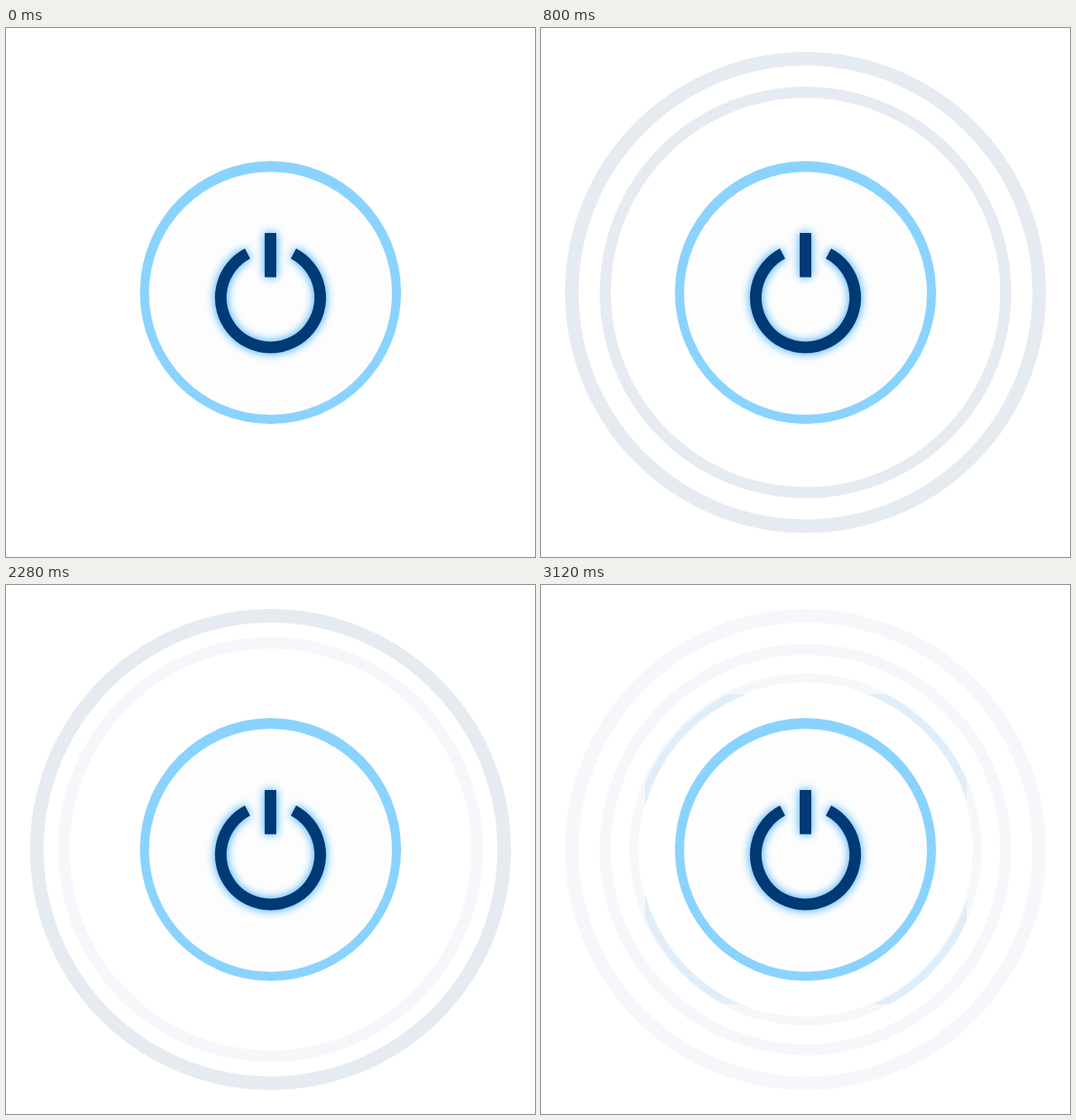
Recreate the animation shown at these times as an HTML page. Size 640 px wide and 640 px high, loop 3.2 s.

```html
<!DOCTYPE html>
<html lang="en">
<head>
<meta charset="utf-8">
<title>Power button pulse</title>
<style>
  html, body { margin: 0; width: 100%; height: 100%; overflow: hidden; background: #fff; }
  svg { display: block; width: 100%; height: 100%; }
  .ring { fill: none; stroke: #e6ebf2; }
  .icon { fill: none; stroke: #003a75; stroke-width: 14; }
</style>
</head>
<body>
<svg viewBox="0 0 640 640">
  <defs>
    <clipPath id="box"><rect x="126" y="132" width="389" height="375"/></clipPath>
    <filter id="glow" x="220" y="215" width="200" height="215" filterUnits="userSpaceOnUse" color-interpolation-filters="sRGB">
      <feDropShadow dx="0" dy="0" stdDeviation="6" flood-color="#2aa5ff"/>
    </filter>
  </defs>
  <g id="rings">
    <circle class="ring" cx="320" cy="320" r="282.75" stroke-width="16.5"/>
    <circle class="ring" cx="320" cy="320" r="242.25" stroke-width="13.5"/>
    <circle class="ring" cx="320" cy="320" r="207.75" stroke-width="10.5"/>
  </g>
  <g id="tint" clip-path="url(#box)">
    <circle cx="321.5" cy="321" r="207" fill="none" stroke="#dcecf9" stroke-width="9"/>
  </g>
  <ellipse cx="320" cy="320" rx="158" ry="159" fill="#8ad3ff"/>
  <ellipse cx="320" cy="321" rx="147" ry="147" fill="#fdfdfd"/>
  <g class="icon" filter="url(#glow)">
    <path d="M292.2 272.9A60.2 60.2 0 1 0 347.8 272.9"/>
    <path d="M320 248V301.5"/>
  </g>
</svg>
<script>
  const PERIOD = 1600;
  // Steps of [time, opacity, scale]
  const enter = [
    [[320, .6, 1.021], [360, .8, 1.01], [400, 1, 1]],
    [[680, .4, 1.032], [720, .6, 1.021], [760, .8, 1.01], [800, 1, 1]],
    [[1040, .4, 1.019], [1080, .6, 1.013], [1120, .8, 1.007], [1200, 1, 1]]
  ];
  const fade = [[1440, .8, 1], [1480, .6, 1], [1520, .4, 1]];
  const tintSteps = [[1440, .9], [1480, .87], [1520, .84]];

  const rings = document.querySelectorAll('.ring');
  const tint = document.getElementById('tint');
  const tracks = enter.map(steps => [...steps, ...fade]);

  const stepAt = (steps, t) => steps.filter(s => s[0] <= t).pop() || [0, 0, 1];

  function draw(t) {
    rings.forEach((ring, i) => {
      const [, alpha, scale] = stepAt(tracks[i], t);
      ring.setAttribute('opacity', alpha);
      ring.setAttribute('transform', `translate(320 320) scale(${scale}) translate(-320 -320)`);
    });
    tint.setAttribute('opacity', stepAt(tintSteps, t)[1]);
  }

  const start = performance.now();
  function tick() {
    draw((performance.now() - start) % PERIOD);
    requestAnimationFrame(tick);
  }
  tick();
</script>
</body>
</html>
```
